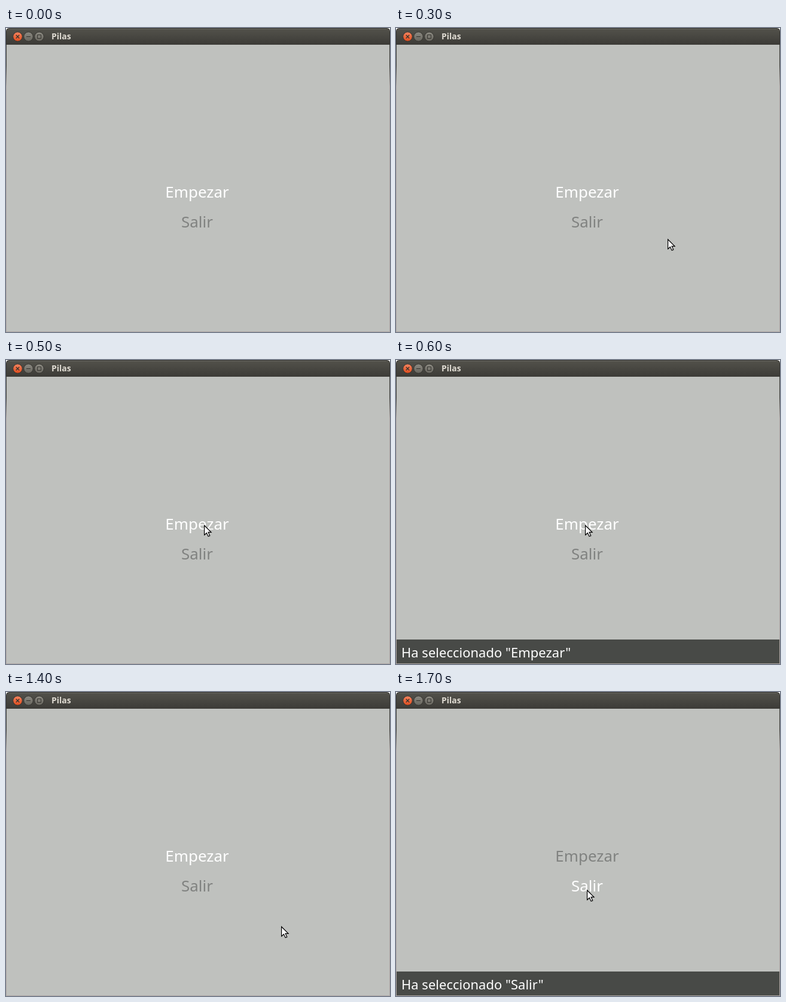
An HTML page that plays this animation: 642 px wide and 509 px high, repeating every 2.3 s.

```html
<!DOCTYPE html>
<html lang="es">
<head>
<meta charset="utf-8">
<title>Pilas</title>
<style>
  html, body { margin: 0; width: 100%; height: 100%; overflow: hidden; background: #fff; }
  svg { display: block; width: 100vw; height: 100vh; }
  text { font-family: "Noto Sans", "Open Sans", sans-serif; }
  .item { font-size: 25.9px; text-anchor: middle; }
  .title { font-size: 14px; font-weight: 700; fill: #dfdbd2; }
  #message { font-size: 22px; fill: #fff; }
</style>
</head>
<body>
<svg viewBox="0 0 642 509">
  <defs>
    <linearGradient id="bar" x2="0" y2="1">
      <stop offset="0" stop-color="#53524b"/>
      <stop offset="1" stop-color="#3c3b37"/>
    </linearGradient>
    <linearGradient id="orange" x2="0" y2="1">
      <stop offset="0" stop-color="#f58561"/>
      <stop offset="1" stop-color="#df4c1d"/>
    </linearGradient>
    <linearGradient id="gray" x2="0" y2="1">
      <stop offset="0" stop-color="#8c8a82"/>
      <stop offset="1" stop-color="#66645d"/>
    </linearGradient>
    <linearGradient id="edge" x2="0" y2="1">
      <stop offset="0" stop-color="#3c3b37"/>
      <stop offset=".5" stop-color="#3c3b37"/>
      <stop offset="1" stop-color="#aea6a4"/>
    </linearGradient>
  </defs>

  <!-- window -->
  <path d="M0 28V6Q0 0 6 0H636Q642 0 642 6V28Z" fill="#2f2e2a"/>
  <path d="M1 28V6Q1 1 6 1H636Q641 1 641 6V28Z" fill="url(#bar)"/>
  <path d="M6 1.5H636" stroke="#6a6962"/>
  <rect y="28" width="642" height="481" fill="#aea6a4"/>
  <rect y="28" width="1" height="70" fill="url(#edge)"/>
  <rect x="641" y="28" width="1" height="70" fill="url(#edge)"/>
  <rect x="1" y="28" width="640" height="480" fill="#bfc1be"/>

  <!-- title buttons -->
  <g stroke="#33322e">
    <circle cx="19.5" cy="14.5" r="7.8" fill="url(#orange)"/>
    <circle cx="37.5" cy="14.5" r="7.8" fill="url(#gray)"/>
    <circle cx="55.5" cy="14.5" r="7.8" fill="url(#gray)"/>
    <path d="M16.8 11.8l5.4 5.4m0-5.4l-5.4 5.4" stroke-width="1.3"/>
    <path d="M34 14.5h7M52.5 11.5h6v6h-6z" fill="none"/>
  </g>
  <text class="title" x="76" y="19">Pilas</text>

  <text class="item" id="start" x="319.5" y="284">Empezar</text>
  <text class="item" id="quit" x="319.5" y="334">Salir</text>

  <g id="status">
    <rect x="1" y="468" width="640" height="40" fill="#484a47"/>
    <text id="message" x="9" y="498"></text>
  </g>

  <g id="cursor">
    <path d="M1.5 1.5V18L5.3 14.5L8 20.3L10.8 19L8.2 13.4H13.3Z" fill="#000" opacity=".22"/>
    <path d="M.6 1V17L4.4 13.5L7.1 19.2L9.7 18L7.1 12.4H12Z" fill="#fff" stroke="#000" stroke-width="1.2"/>
  </g>
</svg>
<script>
const LOOP = 2300, STEP = 100;
const $ = id => document.getElementById(id);

// Each pass glides towards a menu entry, then clicks it.
const passes = [
  { at: 100, from: [577, 430], to: [331, 276], click: [316, 276], label: "Empezar" },
  { at: 1200, from: [581, 456], to: [339, 328], click: [319, 331], label: "Salir" }
];
const GLIDE = 4;

function cursorAt(pass, step) {
  if (step > GLIDE) return pass.click;
  return pass.from.map((a, i) => Math.round(a + (pass.to[i] - a) * step / GLIDE));
}

function draw(t) {
  const pass = passes.filter(p => t >= p.at).pop();
  const step = pass ? Math.floor((t - pass.at) / STEP) : 0;
  const clicked = !!pass && step > GLIDE;
  const onQuit = pass === passes[1] && step >= GLIDE;

  $("start").setAttribute("fill", onQuit ? "#808280" : "#fff");
  $("quit").setAttribute("fill", onQuit ? "#fff" : "#808280");
  $("status").style.display = clicked ? "" : "none";
  $("cursor").style.display = pass ? "" : "none";
  if (!pass) return;
  $("message").textContent = `Ha seleccionado "${pass.label}"`;
  $("cursor").setAttribute("transform", `translate(${cursorAt(pass, step)})`);
}

const begin = performance.now();
function tick() {
  draw((performance.now() - begin) % LOOP);
  requestAnimationFrame(tick);
}
tick();
</script>
</body>
</html>
```
